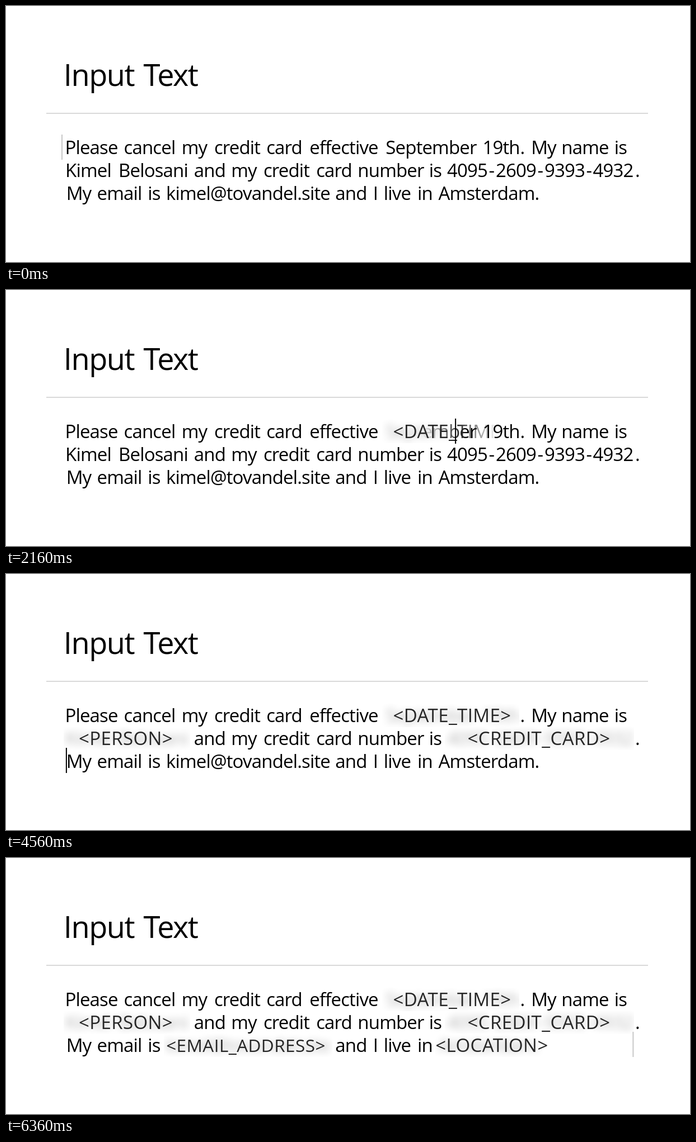
Write an HTML page that moves like this. It is 1222 px wide and 458 px high and loops after 6.42 s.

```html
<!DOCTYPE html>
<html lang="en">
<head>
<meta charset="utf-8">
<title>Input Text</title>
<style>
  html, body { margin: 0; width: 100%; height: 100%; overflow: hidden; background: #fff; }
  svg { display: block; width: 1222px; height: 458px; }
  text { font-family: "Open Sans", "Noto Sans", sans-serif; text-anchor: middle; }
  .title { font-size: 54px; letter-spacing: -1.4px; }
  .body { font-size: 33px; letter-spacing: -.85px; }
  .label { font-size: 33px; letter-spacing: .4px; fill: #262626; }
</style>
</head>
<body>
<svg id="stage" viewBox="0 0 1222 458"></svg>
<script>
const LOOP = 6420, STEP = 60;
const SPEED = 0.5625, REST = 910, LINE_TIME = 1818, BLINK = 1060;
const baseline = line => 265 + 41 * line;

// Words of each line with their centres
const lines = [
  [["Please", 152.5], ["cancel", 256.5], ["my", 336.5], ["credit", 413], ["card", 497], ["effective", 603.5],
   ["September", 759.5], ["19th", 884.5], [".", 922.5], ["My", 960.5], ["name", 1034.5], ["is", 1098]],
  [["Kimel", 147], ["Belosani", 263], ["and", 364], ["my", 425], ["credit", 501], ["card", 586],
   ["number", 687.5], ["is", 767], ["4095", 824], ["-", 867.5], ["2609", 911], ["-", 954.5],
   ["9393", 998], ["-", 1041.5], ["4932", 1084.5], [".", 1128]],
  [["My", 130], ["email", 202.5], ["is", 264.5], ["kimel@tovandel.site", 432.5], ["and", 616.5], ["I", 660],
   ["live", 699], ["in", 748.5], ["Amsterdam.", 862.5]]
];

// Private parts: cover box, label box, and when each starts to wipe in
const items = [
  { text: "<DATE_TIME>", line: 0, box: [672, 917], label: [692, 902], start: 1810, labelStart: 1830 },
  { text: "<PERSON>", line: 1, box: [103, 329], label: [130, 298], start: 2730, labelStart: 2735 },
  { text: "<CREDIT_CARD>", line: 1, box: [784, 1122], label: [825, 1079], start: 3757, labelStart: 3900 },
  { text: "<EMAIL_ADDRESS>", line: 2, box: [282, 583], label: [289, 568], start: 4822, labelStart: 4890, size: 31.5 },
  { text: "<LOCATION>", line: 2, box: [766, 976], label: [768, 968], start: 5600, labelStart: 5680 }
];

const escape = s => s.replace(/</g, "&lt;").replace(/>/g, "&gt;");
const word = (text, x, line) => `<text class="body" x="${x}" y="${baseline(line)}">${text}</text>`;

const wipes = [];
function wipe([x0, x1], y, start, duration, content) {
  const id = wipes.push({ x0, x1, start, duration }) - 1;
  return `<linearGradient id="g${id}" gradientUnits="userSpaceOnUse">
      <stop stop-color="#fff"/><stop offset="1" stop-color="#000"/></linearGradient>
    <mask id="m${id}" maskUnits="userSpaceOnUse" x="${x0}" y="${y}" width="${x1 - x0}" height="42">
      <rect x="${x0}" y="${y}" width="${x1 - x0}" height="42" fill="url(#g${id})"/></mask>
    <g mask="url(#m${id})">${content}</g>`;
}

function drawItem({ text, line, box, label, start, labelStart, size = 33 }) {
  const top = baseline(line) - 33, [x0, x1] = box;
  const hidden = lines[line].filter(([, x]) => x > x0 && x < x1);
  const cover = `<rect x="${x0}" y="${top}" width="${x1 - x0}" height="42" fill="#fff"/>
    <g filter="url(#blur)" opacity=".28">${hidden.map(([s, x]) => word(s, x, line)).join("")}</g>`;
  const tag = `<text class="label" style="font-size:${size}px" x="${(label[0] + label[1]) / 2}"
    y="${baseline(line)}">${escape(text)}</text>`;
  return wipe(box, top, start, 750, cover) +
    wipe([label[0] - 2, label[1] + 2], top, labelStart, 500, tag);
}

const stage = document.getElementById("stage");
stage.innerHTML = `
  <filter id="blur" x="-10%" y="-50%" width="120%" height="200%"><feGaussianBlur stdDeviation="7"/></filter>
  <text class="title" x="166" y="143">Input</text>
  <text class="title" x="294" y="143">Text</text>
  <rect x="72" y="191.5" width="1075" height="1" fill="#b4b4b4"/>
  ${lines.map((row, i) => row.map(([s, x]) => word(s, x, i)).join("")).join("")}
  ${items.map(drawItem).join("")}
  <rect id="caret" width="2" height="45"/>`;

const caret = document.getElementById("caret");
const ends = wipes.map((_, i) => document.getElementById("g" + i));

function draw(t) {
  wipes.forEach(({ x0, x1, start, duration }, i) => {
    const p = Math.min(1, Math.max(0, (t - start) / duration));
    const soft = 0.33 * (x1 - x0);
    const front = x0 + p * (x1 - x0 + soft);
    ends[i].setAttribute("x1", front - soft);
    ends[i].setAttribute("x2", front);
  });
  const run = Math.max(0, t - REST);
  const line = Math.min(2, Math.floor(run / LINE_TIME));
  const lit = (t - 30 + BLINK) % BLINK < BLINK / 2;
  caret.setAttribute("x", 99 + (run - line * LINE_TIME) * SPEED);
  caret.setAttribute("y", 230 + 40.5 * line);
  caret.setAttribute("fill", lit ? "#000" : "#c8c8c8");
}

function tick() {
  const t = performance.now() % LOOP;
  draw(t - t % STEP);
  requestAnimationFrame(tick);
}
tick();
</script>
</body>
</html>
```
